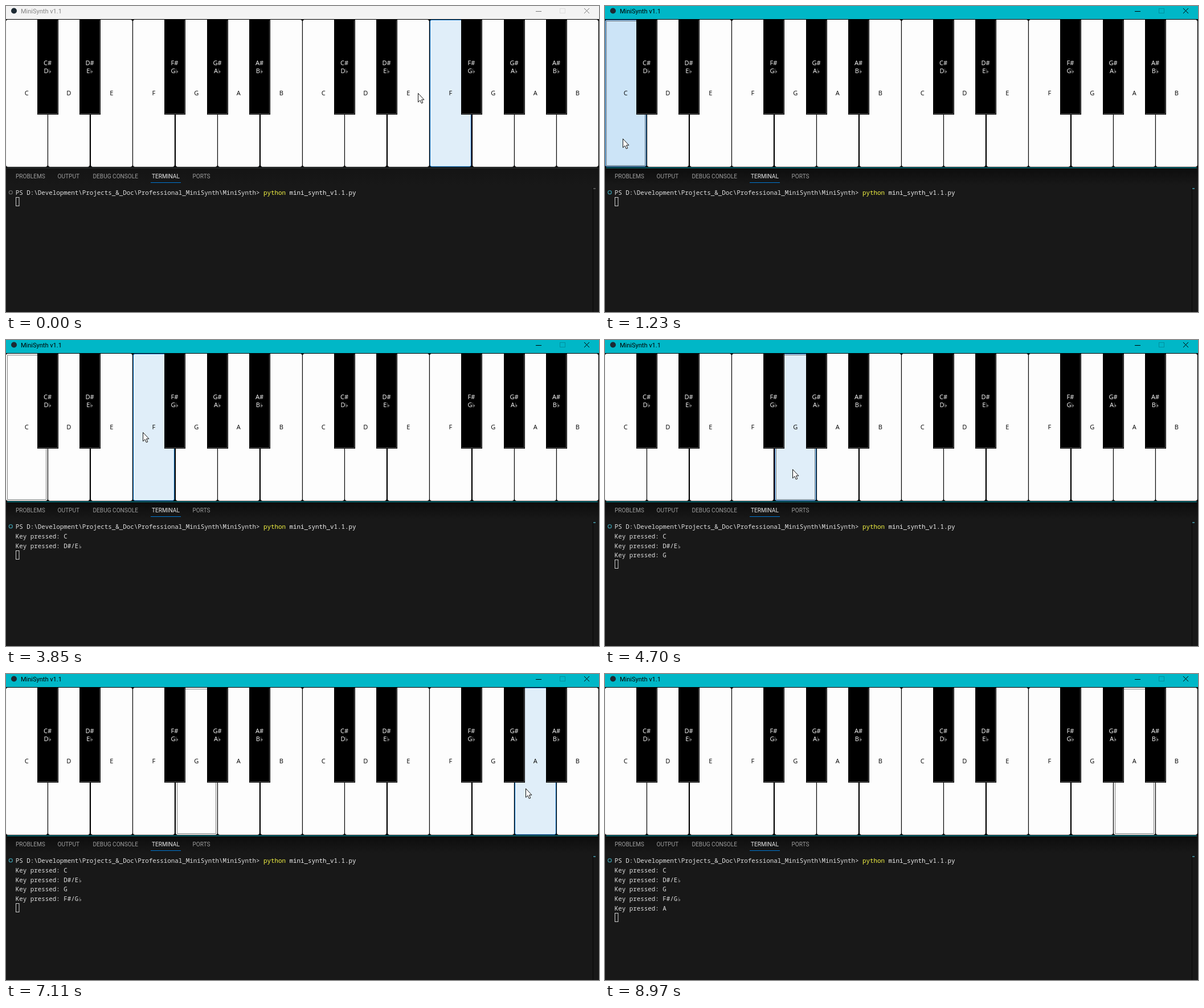
Write an HTML page that moves like this. It is 1041 by 538 pixels and loops after 9030 ms.

```html
<!DOCTYPE html>
<html lang="en">
<head>
<meta charset="utf-8">
<title>MiniSynth</title>
<style>
  html, body { margin: 0; width: 100%; height: 100%; overflow: hidden; background: #181818; }
  svg { display: block; width: 100%; height: 100%; }
  text { white-space: pre; }
  .ui { font: 11px Roboto, sans-serif; }
  .tab { font: 10.1px Roboto, sans-serif; fill: #9d9d9d; }
  .tab.on { fill: #e7e7e7; }
  .label { font: 11px "Open Sans", "DejaVu Sans", sans-serif; text-anchor: middle; }
  .term { font: 500 10.845px "Noto Sans Mono", "DejaVu Sans Mono", monospace; fill: #e0e0e0; }
  .white rect { fill: #fdfdfd; stroke: #f4f4f4; }
  .white.hover rect { fill: #e0eef9; stroke: #0068bd; }
  .white.down rect { fill: #cce4f7; stroke: #005499; }
  .black rect { fill: #000; }
  .black path { fill: none; stroke: #5c5c5c; }
  .black text { fill: #fff; }
  .black.down rect { fill: #f0f0f0; }
  .black.down path { stroke: #a0a0a0; }
  .black.down text { fill: #000; }
  #bar { fill: #f3f3f3; }
  #bar ~ text { fill: #858585; }
  #controls { fill: none; stroke: #777; }
  #max { stroke: #dedede; }
  #edge { fill: #3c4444; }
  #icon { fill: #1d2a33; }
  #status { fill: none; stroke: #666; stroke-width: 1.3; }
  #mark { fill: #555; }
  #shade { opacity: .35; }
  .active #bar { fill: #00b7c7; }
  .active #bar ~ text { fill: #000; }
  .active #controls { stroke: #000; }
  .active #max { stroke: #0091a0; }
  .active #edge { fill: #00a5b5; }
  .active #status { stroke: #3b94a3; }
  .active #mark { fill: #3b7f8c; }
  .active #shade { opacity: 1; }
</style>
</head>
<body>
<svg id="stage" viewBox="0 0 1041 538" preserveAspectRatio="none">
  <defs>
    <linearGradient id="fade" x2="0" y2="1">
      <stop stop-color="#0d0d0d"/><stop offset="1" stop-color="#181818"/>
    </linearGradient>
  </defs>
  <rect width="1041" height="538" fill="#181818"/>
  <rect id="shade" y="285" width="1041" height="30" fill="url(#fade)"/>

  <g>
    <rect id="bar" width="1041" height="23"/>
    <circle id="icon" cx="14" cy="8.5" r="5"/>
    <text class="ui" x="26" y="13">MiniSynth v1.1</text>
    <g id="controls">
      <path d="M930 9.5h10M1015 4l9 9m0-9l-9 9"/>
      <rect id="max" x="972.5" y="4.5" width="9" height="8"/>
    </g>
  </g>
  <rect y="23" width="1041" height="261"/>
  <rect id="edge" x="2" y="284" width="1037" height="1"/>
  <g id="keys"></g>
  <rect id="focus" y="26.5" width="68" height="254" fill="none" stroke="#000" stroke-dasharray="1 1"/>
  <g id="sharps"></g>

  <g id="tabs"></g>
  <path d="M254 310.5h53" stroke="#0078d4"/>
  <path d="M1030.5 319v219" stroke="#0c0c0c" stroke-width="1.5"/>
  <rect id="mark" x="1031" y="320" width="4" height="2"/>
  <circle id="status" cx="8.3" cy="327.7" r="3"/>
  <text class="term" x="16.8" y="332">PS D:\Development\Projects_&amp;_Doc\Professional_MiniSynth\MiniSynth&gt; <tspan fill="#f5f543">python</tspan><tspan fill="#f2f2f2"> mini_synth_v1.1.py</tspan></text>
  <g id="log"></g>
  <rect id="caret" x="17.5" width="5.5" height="15" fill="none" stroke="#d0d0d0"/>
  <path id="pointer" d="M.5.5V16L4 12.7 6.3 18 8.8 17 6.5 11.8H11Z" fill="#fff" stroke="#111" stroke-linejoin="round"/>
</svg>
<script>
const LOOP = 9030, PITCH = 74.42, LINE = 16.75, ACTIVATED = 1230, GONE = 8970;
const $ = id => document.getElementById(id);
const keyLeft = i => Math.round(i * PITCH);

function add(parent, name, attrs, text) {
  const el = document.createElementNS('http://www.w3.org/2000/svg', name);
  for (const key in attrs) el.setAttribute(key, attrs[key]);
  if (text) el.textContent = text;
  return parent.appendChild(el);
}

const whites = [...'CDEFGABCDEFGAB'].map((note, i) => {
  const g = add($('keys'), 'g', { class: 'white' });
  add(g, 'rect', { x: keyLeft(i) + .5, y: 24.5, width: 71.8, height: 257.8, rx: 2.5 });
  add(g, 'text', { class: 'label', x: keyLeft(i) + 36.3, y: 157 }, note);
  return g;
});

const sharps = [];
['C#D♭', 'D#E♭', , 'F#G♭', 'G#A♭', 'A#B♭'].forEach((names, i) => {
  for (const octave of [0, 7]) {
    const x = Math.floor((i + octave) * PITCH + 55.4);
    const g = add($('sharps'), 'g', { class: 'black' });
    add(g, 'rect', { x, y: 23, width: 37, height: 168 });
    add(g, 'path', { d: `M${x + 1} 189.5h34.5V25` });
    add(g, 'text', { class: 'label', x: x + 18, y: 104 }, names.slice(0, 2));
    add(g, 'text', { class: 'label', x: x + 18, y: 118 }, names.slice(2));
    sharps.push({ g, x, slot: i + octave });
  }
});

const tabs = { PROBLEMS: 17, OUTPUT: 90.5, 'DEBUG CONSOLE': 152.5, TERMINAL: 256, PORTS: 327.5 };
for (const name in tabs)
  add($('tabs'), 'text', { class: name === 'TERMINAL' ? 'tab on' : 'tab', x: tabs[name], y: 303 }, name);

const presses = [
  { note: 'C', down: 1230, up: 1420, white: 0 },
  { note: 'D#/E♭', down: 3030, up: 3230, sharp: 1 },
  { note: 'G', down: 4440, up: 4700, white: 4 },
  { note: 'F#/G♭', down: 6300, up: 6500, sharp: 10 },
  { note: 'A', down: 7970, up: 8180, white: 12 }
];
const log = presses.map((p, i) =>
  add($('log'), 'text', { class: 'term', x: 16.8, y: 332 + LINE * (i + 1) }, 'Key pressed: ' + p.note));

// Pointer moves: start, end, steps, x, y
const moves = [
  [70, 420, 6, 79, 211],
  [550, 890, 6, 31, 233],
  [2350, 2350, 1, 39, 221],
  [2430, 2830, 6, 148, 170],
  [3700, 3850, 3, 240, 162],
  [3900, 4150, 5, 329, 227],
  [5430, 6030, 10, 831, 175],
  [6900, 7110, 4, 912, 201],
  [7180, 7450, 5, 925, 225],
  [8830, 8900, 2, 1005, 150]
];

function pointerAt(t) {
  let x = 723, y = 153;
  for (const [start, end, steps, toX, toY] of moves) {
    if (t < start) break;
    const step = t >= end ? steps : Math.floor((t - start) / (end - start) * (steps - 1)) + 1;
    x += (toX - x) * step / steps;
    y += (toY - y) * step / steps;
  }
  return { x: Math.round(x), y: Math.round(y) };
}

function hoveredKey(t, { x, y }) {
  if (t < 70) return 10;
  if (t >= GONE || (y < 191 && sharps.some(s => x >= s.x && x < s.x + 37))) return -1;
  return Math.floor(x / PITCH);
}

function draw(t) {
  const pointer = pointerAt(t);
  const hover = hoveredKey(t, pointer);
  const held = presses.find(p => t >= p.down && t < p.up) || {};
  const focused = presses.filter(p => p.white !== undefined && t >= p.down).pop();
  const lines = presses.filter(p => t >= p.up).length;

  $('stage').classList.toggle('active', t >= ACTIVATED);
  whites.forEach((g, i) => {
    g.classList.toggle('hover', i === hover);
    g.classList.toggle('down', i === held.white);
  });
  sharps.forEach(s => s.g.classList.toggle('down', s.slot === held.sharp));
  log.forEach((line, i) => line.style.display = i < lines ? '' : 'none');
  $('caret').setAttribute('y', Math.round(LINE * lines + 336) + .5);
  $('focus').style.display = focused ? '' : 'none';
  if (focused) $('focus').setAttribute('x', keyLeft(focused.white) + 2.5);
  $('pointer').setAttribute('transform', `translate(${pointer.x} ${pointer.y})`);
  $('pointer').style.display = t < GONE ? '' : 'none';
}

const began = performance.now();
function tick() {
  draw((performance.now() - began) % LOOP);
  requestAnimationFrame(tick);
}
tick();
</script>
</body>
</html>
```
